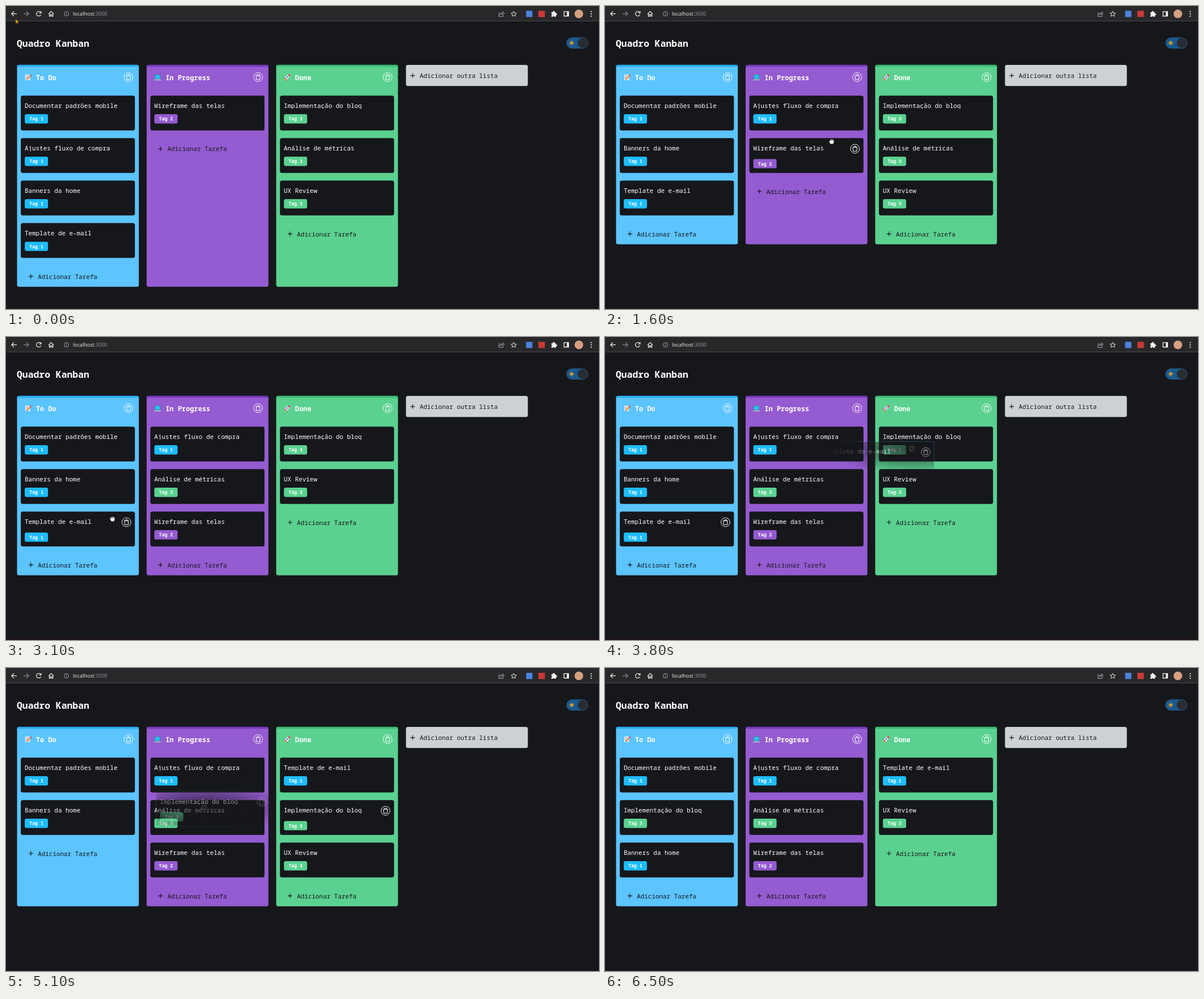
These frames come from a looping animation (1046x535 px, 6700 ms). An HTML page:

```html
<!DOCTYPE html>
<html lang="pt-BR">
<head>
<meta charset="utf-8">
<title>Quadro Kanban</title>
<style>
  html, body { margin: 0; width: 100%; height: 100%; overflow: hidden; background: #16171b; }
  svg { display: block; width: 100%; height: 100%; }
  text { font: 500 10.93px 'Noto Sans Mono', monospace; white-space: pre; }
  .title { font-size: 16.4px; font-weight: 700; fill: #fff; }
  .head { font-size: 11.95px; font-weight: 700; fill: #fff; }
  .tag { font-size: 8.2px; font-weight: 700; fill: #fff; }
  .add { font-weight: 400; fill: #16171b; }
  .url { font: 400 9px 'Open Sans', sans-serif; fill: #f1f1f2; }
  .line { fill: none; stroke: #e8e9eb; stroke-width: 1.25; }
</style>
</head>
<body>
<svg viewBox="0 0 1046 535">
  <defs>
    <clipPath id="textLine"><rect y="8" width="195" height="15.4"/></clipPath>
    <radialGradient id="fade">
      <stop offset="0" stop-color="#fff" stop-opacity=".72"/>
      <stop offset=".35" stop-color="#fff" stop-opacity=".52"/>
      <stop offset="1" stop-color="#fff" stop-opacity="0"/>
    </radialGradient>
    <mask id="ghostMask" maskUnits="userSpaceOnUse" x="0" y="0" width="1046" height="535">
      <ellipse id="halo" rx="152" ry="43" fill="url(#fade)"/>
    </mask>
    <g id="trash" fill="none" stroke="#fff">
      <circle r="7.9" stroke-width=".9"/>
      <path d="M-4.3-2.6H4.3M-1.7-2.8V-4.4H1.7V-2.8M-3.3-2.4V4.4H3.3V-2.4" stroke-width="1"/>
    </g>
    <path id="plus" d="M-4 0H4M0-4V4" stroke="#16171b" stroke-width="1.15"/>
    <g id="memo">
      <path d="M-5-5H3L4 5H-5Z" fill="#e6e4e8"/>
      <path d="M-3.5-2.5H1M-3.5 0H0M-3.5 2.5H1" stroke="#9a9aa8" stroke-width=".8"/>
      <path d="M-1.5 3L4.5-3" stroke="#f3952d" stroke-width="2.3"/>
      <path d="M4-2.5L5.7-4.2" stroke="#df3d55" stroke-width="2.4"/>
      <path d="M-2.8 4.3L-.9 3.4L-1.9 2.4Z" fill="#333"/>
    </g>
    <g id="laptop">
      <path d="M-5-5H5V3H-5Z" fill="#3a78a8"/>
      <path d="M-4.2-4.2H4.2V2.3H-4.2Z" fill="#24c4ec"/>
      <path d="M-5 3H5L6.5 5.4H-6.5Z" fill="#9db1c0"/>
    </g>
    <g id="rocket" transform="rotate(45)">
      <path d="M-2.4 2L-4.5 5.2L-1.5 4ZM2.4 2L4.5 5.2L1.5 4Z" fill="#c52b48"/>
      <path d="M-1.5 4L0 7.5L1.5 4Z" fill="#f7b52c"/>
      <path d="M-2.6 4V-3Q-2-6 0-7.5Q2-6 2.6-3V4Z" fill="#e6e8ef"/>
      <path d="M-2.3-3.8Q-1.6-6.2 0-7.5Q1.6-6.2 2.3-3.8Z" fill="#de3454"/>
      <circle cy="-1" r="1.4" fill="#3d83c4"/>
      <path d="M0 1.5V5" stroke="#c52b48" stroke-width="1.4"/>
    </g>
    <path id="arrow" d="M0 0V8L1.9 6.3L3.1 9L4.4 8.4L3.2 5.8H5.8Z" fill="#f8a91c" stroke="#352407" stroke-width=".5"/>
    <g id="hand" stroke-linecap="round" stroke-linejoin="round">
      <path d="M-2.8 0V-2.4M-.9 0V-3.6M1 0V-3.6M2.8 0V-2.6M-4 .4L-1.8 4H2L3.2 1V-.6H-2.6Z" fill="#111" stroke="#111" stroke-width="2.2"/>
      <path d="M-2.8 0V-2.4M-.9 0V-3.6M1 0V-3.6M2.8 0V-2.6M-4 .4L-1.8 4H2L3.2 1V-.6H-2.6Z" fill="#fff" stroke="#fff" stroke-width="1.05"/>
    </g>
    <path id="fist" d="M-3.4-1.8Q-2.5-3-1.5-2.2Q-.4-3.2.6-2.2Q1.6-3 2.4-1.9Q3.8-2.2 3.7-.5L3.3 1.4L2 4H-1.6L-3.9.7Z" fill="#fff" stroke="#111" stroke-width=".9"/>
    <g id="noDrop" fill="none">
      <circle r="3.6" stroke="#b6b493" stroke-width="2.6" opacity=".55"/>
      <path d="M-3.6 0A3.6 3.6 0 1 0 3.6 0A3.6 3.6 0 1 0-3.6 0M-2.5-2.5L2.5 2.5" stroke="#17191b" stroke-width="1.6"/>
    </g>
  </defs>

  <rect width="1046" height="535" fill="#16171b"/>
  <rect y="534" width="1046" height="1" fill="#34131b"/>

  <g id="browserBar">
    <rect width="1046" height="26" fill="#28282b"/>
    <rect y="26" width="1046" height="1" fill="#4b4b4e"/>
    <path class="line" d="M19 13.7H10M14 9.5L9.8 13.7L14 17.9"/>
    <path class="line" d="M31 13.7H40M36 9.5L40.2 13.7L36 17.9" style="stroke:#85868a"/>
    <path class="line" d="M61 11.1A4.1 4.1 0 1 0 61.5 15.3M61.9 9V12.3H58.6"/>
    <path class="line" d="M75.2 14L79.6 9.6L84 14M76.5 13V18H78.5V15H80.7V18H82.7V13"/>
    <g class="line" style="stroke:#a0a1a5;stroke-width:1">
      <circle cx="106.7" cy="13.8" r="4"/>
      <path d="M106.7 13.2V16M106.7 11.3V12.3"/>
      <path d="M872 12H869.5V18.5H877V16M871.5 16Q872 12.4 876 12.2V10L879 13L876 15.6V13.6Q873 13.6 871.5 16Z"/>
    </g>
    <text class="url" x="118" y="17.2">localhost<tspan fill="#97989c">:3000</tspan></text>
    <path class="line" style="stroke-width:1" d="M895.6 9.3L897 12.4L900.3 12.7L897.8 14.9L898.6 18.2L895.6 16.4L892.6 18.2L893.4 14.9L890.9 12.7L894.2 12.4Z"/>
    <rect x="917.5" y="8.5" width="11" height="11" fill="#4b83dc"/>
    <rect x="939" y="8.5" width="11.5" height="11" fill="#c93a35"/>
    <path d="M962 11H964.5A1.7 1.7 0 1 1 967.7 11H970V13.3A1.6 1.6 0 1 1 970 16.3V19H967.5A1.6 1.6 0 0 0 964.6 19H962V16.4A1.6 1.6 0 0 0 962 13.5Z" fill="#f1f1f2"/>
    <path d="M983.7 9.2H993V18.4H983.7ZM985 10.5V17.1H989.3V10.5Z" fill="#f1f1f2" fill-rule="evenodd"/>
    <circle cx="1010.5" cy="13.8" r="7.6" fill="#d6a080"/>
    <path d="M1032.3 9V11M1032.3 13V15M1032.3 17V19" stroke="#e8e9eb" stroke-width="1.9"/>
  </g>

  <text class="title" x="19" y="71.8">Quadro Kanban</text>
  <rect x="989" y="56" width="37.5" height="18.6" rx="9.3" fill="#18598e" stroke="#31699a" stroke-width=".8"/>
  <circle cx="1017.3" cy="65.3" r="8.8" fill="#292c31"/>
  <circle cx="997.8" cy="65.3" r="2.4" fill="#f9a825"/>
  <circle cx="997.8" cy="65.3" r="3.8" fill="none" stroke="#f9a825" stroke-width="1.4" stroke-dasharray="1 1.985"/>

  <rect x="705.5" y="104" width="215" height="37.3" rx="3.5" fill="#cdd1d6"/>
  <use href="#plus" x="717.3" y="122.8"/>
  <text class="add" x="729.7" y="127.2">Adicionar outra lista</text>

  <g id="board"></g>
  <g id="ghost" mask="url(#ghostMask)"></g>
  <use id="pointer"/>
</svg>

<script>
const LOOP = 6700, STEP = 100;
const ROW = 75.05, CARD_TOP = 158.2, COLUMN_PITCH = 228.55;

const columns = [
  { name: 'To Do', icon: 'memo', fill: '#5cc4ff', edge: '#28abf3', tag: '#1fbcfd' },
  { name: 'In Progress', icon: 'laptop', fill: '#955bd1', edge: '#7838bd', tag: '#955bd1' },
  { name: 'Done', icon: 'rocket', fill: '#5bd190', edge: '#3abb70', tag: '#5bd190' }
];

// Each key is the letter used in the layouts below; the number is the tag.
const tasks = {
  D: ['Documentar padrões mobile', 1],
  A: ['Ajustes fluxo de compra', 1],
  B: ['Banners da home', 1],
  T: ['Template de e-mail', 1],
  W: ['Wireframe das telas', 2],
  N: ['Análise de métricas', 3],
  I: ['Implementação do blog', 3],
  U: ['UX Review', 3]
};

const layouts = [
  [0, 'DABT W INU'],
  [1300, 'DBT AW INU'],
  [2400, 'DBT ANW IU'],
  [4000, 'DB ANW TIU'],
  [5400, 'DIB ANW TU']
];

const drags = [
  { from: 800, to: 1300, id: 'A' },
  { from: 1900, to: 2400, id: 'N' },
  { from: 3300, to: 4000, id: 'T', grabAt: 3200 },
  { from: 4900, to: 5400, id: 'I', grabAt: 4800 }
];

const presses = [[3000, 3100], [4700, 4900]];

const route = [
  [0, 17, 23], [700, 138, 254], [800, 138, 254], [1100, 285, 199], [1400, 285, 199],
  [1800, 515, 279], [1900, 515, 279], [2200, 222, 307], [2600, 197, 310], [2700, 197, 310],
  [2800, 188, 321], [3200, 188, 321], [3900, 562, 190], [4200, 562, 190], [4500, 568, 262],
  [4800, 568, 262], [5400, 131, 231], [5800, 131, 231], [5900, 139, 225], [6000, 139, 225],
  [6300, 79, 9]
];

const byId = id => document.getElementById(id);
const columnX = i => 19.5 + COLUMN_PITCH * i;
const cardX = i => columnX(i) + 6.6;
const cardY = row => CARD_TOP + ROW * row;
const during = (t, [from, to]) => t >= from && t < to;

function pointerAt(t) {
  const next = route.findIndex(p => p[0] > t);
  if (next < 0) return route[route.length - 1].slice(1);
  const [t0, x0, y0] = route[next - 1], [t1, x1, y1] = route[next];
  const u = (t - t0) / (t1 - t0), k = u * u * (3 - 2 * u);
  return [x0 + (x1 - x0) * k, y0 + (y1 - y0) * k];
}

function cardSvg(id, column, row, hover, stroke = 'none') {
  const [name, tag] = tasks[id];
  const tagY = hover ? 36.9 : 32.8;
  return `<g transform="translate(${cardX(column)} ${cardY(row)})">
    <rect width="201.3" height="61.5" rx="3.5" fill="#16171b" stroke="${stroke}" stroke-opacity=".5"/>
    <text x="6.8" y="21.9" fill="#fff" clip-path="url(#textLine)">${name}</text>
    <rect x="7" y="${tagY}" width="41" height="16.4" rx="3.2" fill="${columns[tag - 1].tag}"/>
    <text class="tag" x="15.2" y="${tagY + 11.4}">Tag ${tag}</text>
    ${hover ? '<use href="#trash" x="186.3" y="18.8"/>' : ''}</g>`;
}

function columnSvg(column, i, ids, height, hoverId) {
  const x = columnX(i), addY = 181.4 + ROW * ids.length;
  return `<rect x="${x}" y="104" width="214.8" height="${height}" rx="3.5" fill="${column.fill}"/>
    <path d="M${x} 107.2V106.5Q${x} 103.7 ${x + 3.5} 103.7H${x + 211.3}Q${x + 214.8} 103.7 ${x + 214.8} 106.5V107.2Z" fill="${column.edge}"/>
    <use href="#${column.icon}" x="0" y="0" transform="translate(${x + 19.3} 126)"/>
    <text class="head" x="${x + 33.4}" y="130.5">${column.name}</text>
    <use href="#trash" x="${x + 196.6}" y="125.6"/>
    ${ids.map((id, row) => cardSvg(id, i, row, id === hoverId)).join('')}
    <use href="#plus" x="${x + 24.4}" y="${addY - 4.2}"/>
    <text class="add" x="${x + 36.7}" y="${addY}">Adicionar Tarefa</text>`;
}

function findCard(lists, match) {
  for (let column = 0; column < lists.length; column++)
    for (let row = 0; row < lists[column].length; row++)
      if (match(lists[column][row], column, row)) return { id: lists[column][row], column, row };
}

function render(t) {
  const [x, y] = pointerAt(t);
  const lists = layouts.filter(l => l[0] <= t).pop()[1].split(' ').map(s => [...s]);
  const drag = drags.find(d => during(t, [d.from, d.to]));
  const active = findCard(lists, (id, column, row) => drag ? id === drag.id :
    x >= cardX(column) && x <= cardX(column) + 201.3 && y >= cardY(row) && y <= cardY(row) + 61.5);
  const tallest = Math.max(...lists.map(l => l.length));

  byId('board').innerHTML = columns.map((c, i) =>
    columnSvg(c, i, lists[i], 91.5 + ROW * tallest, active && active.id)).join('');

  const ghost = byId('ghost');
  ghost.innerHTML = '';
  if (drag) {
    const [gx, gy] = pointerAt(drag.grabAt || drag.from);
    byId('halo').setAttribute('transform', `translate(${gx} ${gy})`);
    ghost.setAttribute('transform', `translate(${x - gx} ${y - gy})`);
    ghost.innerHTML = cardSvg(active.id, active.column, active.row, true, columns[active.column].fill);
  }

  const overLists = y > 150 && columns.some((c, i) => x > columnX(i) && x < columnX(i) + 214.8);
  const shape = drag ? 'noDrop' : presses.some(p => during(t, p)) ? 'fist' : overLists ? 'hand' : 'arrow';
  const pointer = byId('pointer');
  pointer.setAttribute('href', '#' + shape);
  pointer.setAttribute('transform', `translate(${x} ${y})`);
  pointer.setAttribute('visibility', t < 6500 ? 'visible' : 'hidden');
}

let shown = -1;
function tick() {
  const step = Math.floor(performance.now() % LOOP / STEP);
  if (step !== shown) render((shown = step) * STEP);
  requestAnimationFrame(tick);
}
tick();
</script>
</body>
</html>
```
